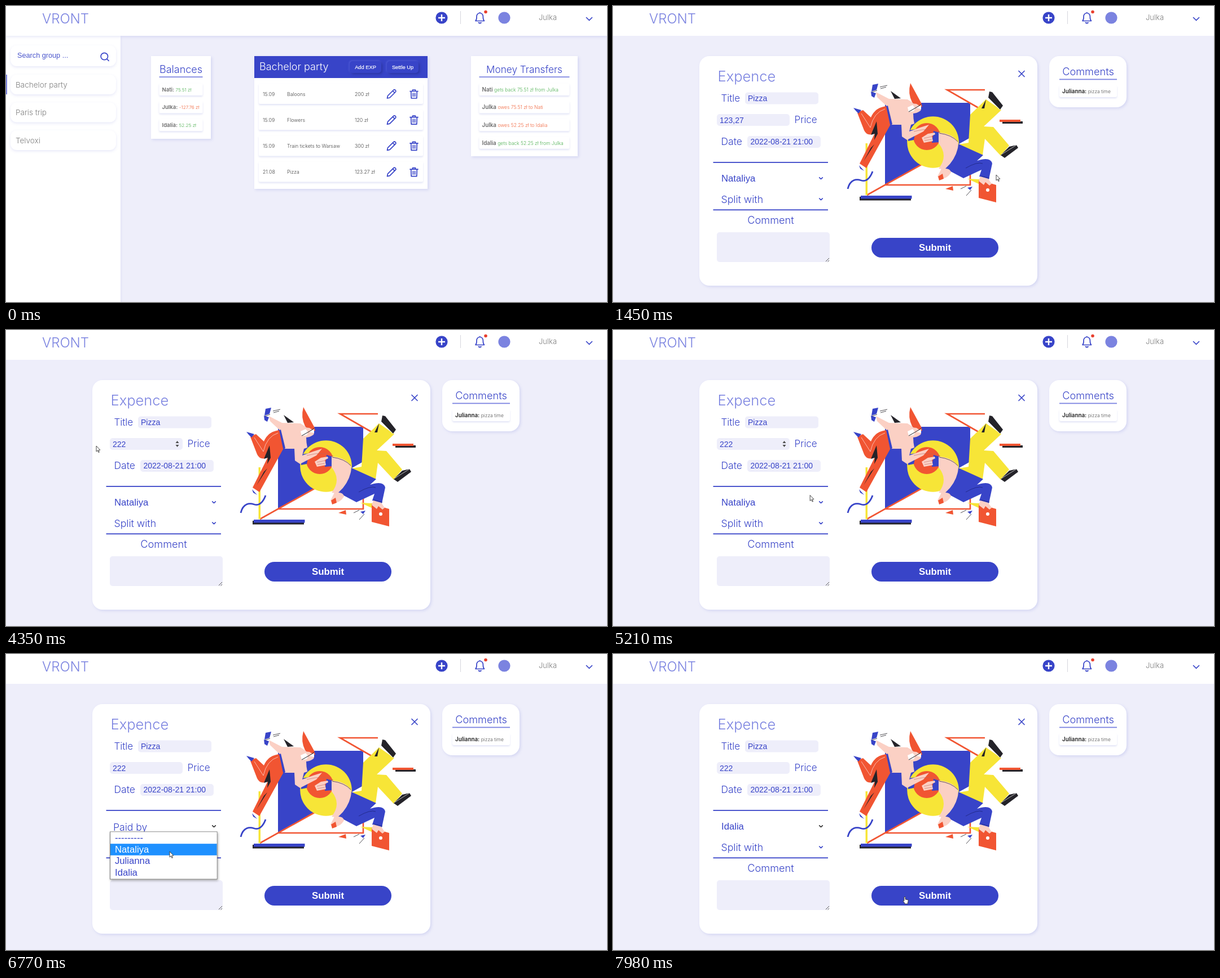
An HTML page for the animation above (8000 ms loop, 1065 px wide and 526 px high).

```html
<!DOCTYPE html>
<html lang="en">
<head>
<meta charset="utf-8">
<title>Shared expenses</title>
<style>
  html, body { margin: 0; width: 100%; height: 100%; overflow: hidden; background: #eeeefa; }
  svg { display: block; width: 100vw; height: 100vh; }
  text { font-family: Inter, sans-serif; font-weight: 340; white-space: pre; }
  .arial { font-family: "Liberation Sans", Arial, sans-serif; font-weight: 400; }
  .mid { text-anchor: middle; }
  .bold { font-weight: 600; }
  .strong { font-weight: 700; }
  .card { filter: drop-shadow(2px 2px 2.5px rgba(70, 80, 200, .15)); }
  .row { filter: drop-shadow(0 2px 1.5px rgba(70, 80, 200, .16)); }
  .soft { filter: drop-shadow(0 2px 2.5px rgba(70, 80, 200, .13)); }
  .raised { filter: drop-shadow(2px 2px 2px rgba(20, 28, 120, .55)) drop-shadow(-1px -1px 1.5px rgba(110, 122, 240, .5)); }
  .popup { filter: drop-shadow(1px 2px 2px rgba(0, 0, 0, .35)); }
  .line { fill: none; stroke: #3844c8; stroke-width: 1.7; stroke-linecap: round; stroke-linejoin: round; }
</style>
</head>
<body>
<svg id="stage" viewBox="0 0 1065 526" preserveAspectRatio="none"></svg>
<script>
const LOOP = 8000;
const BLUE = '#3844c8', LILAC = '#7b83e0', FIELD = '#eeeefa', GRAY = '#7f7f7f';
const GREEN = '#4caf50', RED = '#f0643c';
const ORANGE = '#f15532', YELLOW = '#f7e537', PINK = '#fbd0c4', BLACK = '#242329';

const rect = (x, y, x2, y2, fill, r = 0, cls = '') =>
  `<rect x="${x}" y="${y}" width="${x2 - x}" height="${y2 - y}" rx="${r}" fill="${fill}" class="${cls}"/>`;
const text = (x, y, size, str, fill = BLUE, cls = '', id = '') =>
  `<text x="${x}" y="${y}" font-size="${size}" fill="${fill}" class="${cls}" id="${id}">${str}</text>`;
const arial = (x, y, size, str, fill = BLUE, cls = '', id = '') => text(x, y, size, str, fill, 'arial ' + cls, id);
const circle = (x, y, r, fill) => `<circle cx="${x}" cy="${y}" r="${r}" fill="${fill}"/>`;
const shape = (d, fill) => `<path d="${d}" fill="${fill}"/>`;
const stroke = (d, color, w) => `<path d="${d}" fill="none" stroke="${color}" stroke-width="${w}"/>`;
const icon = (d, x = 0, y = 0, id = '') => `<path class="line" d="${d}" transform="translate(${x} ${y})" id="${id}"/>`;
const pair = (x, y, name, note, color, size, dark = '#6c6c6c') =>
  `<text x="${x}" y="${y}" font-size="${size}" fill="${color}"><tspan class="bold" font-size="${size + 1.3}" fill="${dark}">${name}</tspan><tspan dx="2.5">${note}</tspan></text>`;

function header() {
  return rect(0, 0, 1065, 53, '#fff') +
    text(64, 31, 24, 'VRONT', LILAC) +
    circle(772, 21, 10.6, BLUE) + stroke('M772 15V27M766 21H778', '#fff', 2.4) +
    rect(805, 9, 806, 32, '#d6d6de') +
    icon('M832 26.5C834.5 24 834 21 834 18.500A5.700 6 0 0 1 845.400 18.500C845.400 21 845 24 847.500 26.500ZM837.500 29.500Q839.700 31.500 842 29.500M839.700 12.500V11.500') +
    circle(850, 10.5, 2.8, '#e8402f') +
    circle(883, 21, 10.6, LILAC) +
    text(944, 25.3, 13, 'Julka', GRAY) +
    icon('M1028.500 20.500L1033.500 25.500L1038.500 20.500');
}

function sidebar() {
  const items = ['Bachelor party', 'Paris trip', 'Telvoxi'].map((name, i) => {
    const y = 122 + i * 49.5;
    return rect(8, y, 195, y + 35, '#fff', 11, 'soft') + text(17, y + 22.7, 13.5, name, GRAY);
  });
  return rect(0, 53, 203, 526, '#fff', 0, 'soft') +
    rect(8, 70, 195, 107, '#fff', 11, 'soft') +
    arial(20, 92, 12.7, 'Search group ...', '#4a55cc') +
    icon('M180.500 89.500A6.200 6.200 0 1 1 168.100 89.500A6.200 6.200 0 1 1 180.500 89.500M178.800 94L182 97.300') +
    items.join('') + rect(0, 122, 2, 157, LILAC);
}

function summary(x, x2, bottom, title, size, rows) {
  const a = x + 14.5, b = x2 - 14.5;
  return rect(x, 89, x2, bottom, '#fff', 0, 'card') +
    text((x + x2) / 2, 119, size, title, BLUE, 'mid') + rect(a, 125.3, b, 127, LILAC) +
    rows.map(([name, note, color, s], i) => {
      const y = 137.500 + i * 31.600;
      return rect(a, y, b, y + 21.5, '#fff', 2, 'row') + pair(a + 5, y + 14.3, name, note, color, s);
    }).join('');
}

const pencil = 'M1 16L2 11.500L12.500 1Q14 0 15.500 1.500T16 4.500L5.500 15ZM11 3L14 6';
const bin = 'M0 3H14M4.500 3V.5H9.500V3M1.700 3L2.200 15.500H11.800L12.300 3M5.400 6.500V12M8.600 6.500V12';

function expenses() {
  const rows = [
    ['15.09', 'Baloons', '200 zł'], ['15.09', 'Flowers', '120 zł'],
    ['15.09', 'Train tickets to Warsaw', '300 zł'], ['21.08', 'Pizza', '123.27 zł']
  ].map(([day, what, sum], i) => {
    const y = 138 + i * 46.2, base = y + 21.7;
    return rect(448, y, 739, y + 36, '#fff', 2, 'row') +
      text(455, base, 8.75, day, '#444') + text(498, base, 8.75, what, '#444') + text(618, base, 8.75, sum, '#444') +
      icon(pencil, 674.5, y + 10) + icon(bin, 716, y + 10.5);
  });
  const button = (x, x2, label) => rect(x, 98, x2, 119, BLUE, 5, 'raised') +
    `<g stroke="#fff" stroke-width=".2">${arial((x + x2) / 2, 111.5, 9.3, label, '#fff', 'mid')}</g>`;
  return rect(440, 89, 747, 325, '#fff', 0, 'card') + rect(440, 89, 747, 128, BLUE) +
    text(449, 114, 18, 'Bachelor party', '#fff') +
    button(609, 665, 'Add EXP') + button(675, 731, 'Settle Up') + rows.join('');
}

function dashboard() {
  return sidebar() +
    summary(257, 363, 236, 'Balances', 18, [
      ['Nati:', '75.51 zł', GREEN, 8.2], ['Julka:', '-127.76 zł', RED, 8.2], ['Idalia:', '52.25 zł', GREEN, 8.2]]) +
    expenses() +
    summary(824, 1013, 267, 'Money Transfers', 17.2, [
      ['Nati', 'gets back 75.51 zł from Julka', GREEN, 8.5], ['Julka', 'owes 75.51 zł to Nati', RED, 8.5],
      ['Julka', 'owes 52.25 zł to Idalia', RED, 8.5], ['Idalia', 'gets back 52.25 zł from Julka', GREEN, 8.5]]) +
    rect(0, 40, 1065, 53, '#fff', 0, 'soft');
}

function art() {
  return shape('M482 172H633V234L482 318Z', BLUE) +
    stroke('M450 336L548 281M482 318H633V299M659 149H592L651 183', ORANGE, 2.6) +
    rect(447.5, 244, 451, 336, YELLOW) +
    rect(437, 339, 528, 345.5, BLACK) + rect(439, 337, 529.5, 342.5, BLUE) +
    stroke('M416 325C420 308 431 307 440 310S456 305 460 294', BLUE, 2.8) +
    // falling figure on the right
    circle(567, 242, 45.8, YELLOW) + circle(556, 232, 24, ORANGE) +
    shape('M568 222L579 225V242L565 243ZM523 221L537 219L533 238L523 240Z', BLUE) +
    shape('M661 166L688 185L657 214L674 215L702 248L687 266L659 236L655 265L612 246L630 243L633 193Z', YELLOW) +
    shape('M667 152L672 153L691 177L686 184L665 163ZM715 247L718 252L694 270L687 265L702 250Z', BLACK) +
    stroke('M665 163L686 185M688 264L715 247', '#fff', .7) +
    shape('M653 182L661 166L658 182Z', BLACK) +
    shape('M577 225Q600 226 611 241Q615 261 600 276L590 291L577 289Q595 266 577 244Z', PINK) +
    stroke('M578 226Q600 229 611 241', BLACK, .7) +
    shape('M612 245L656 265L645 275Q669 267 672 280L666 308L649 303L653 291L621 306L589 289Q610 270 612 245Z', BLUE) +
    stroke('M625 288Q646 276 655 280M652 302L667 306', '#1d267d', .8) +
    shape('M582 289Q598 287 599 296Q592 307 582 307L575 303Z', PINK) + shape('M576 303L584 298L586 307L578 310Z', ORANGE) +
    shape('M628 307L649 308L650 317Z', YELLOW) +
    shape('M648 309L679 318V349L648 341Z', ORANGE) + circle(664, 327, 3, '#fff') +
    shape('M651 303L665 307L671 316L667 319L660 313L657 318L648 311Z', PINK) +
    rect(690, 205, 726, 209, BLACK) + rect(685, 202, 722, 206, ORANGE) +
    // running figure on the left
    shape('M438 187L443 185L457 198Q465 179 486 178L492 210L449 288L437 280L464 226Q451 233 445 221L433 190Z', ORANGE) +
    shape('M426 181L440 185L435 191L430 186ZM436 283L445 293L438 289Z', BLUE) +
    shape('M467 205L457 229L464 227L463 238L469 227Z', BLACK) + shape('M457 252L463 246L444 276Z', BLACK) +
    stroke('M440 191L456 216Q462 189 482 183', '#fff', .6) +
    shape('M466 153L489 165L522 166L534 174Q530 191 534 209L528 211L525 223L544 216L560 211L550 223L521 238L512 232L511 211L494 211L485 178L468 162Z', PINK) +
    shape('M484 178L487 177L495 210L491 211ZM460 140L470 138L467 149L458 152ZM457 152L466 155L463 163L458 160Z', BLUE) +
    shape('M492 151L510 164L499 165Z', BLACK) +
    stroke('M473 144L486 141M474 147L484 144M459 153L468 150', BLACK, .8) +
    shape('M527 137L546 172L548 179L540 180L530 171Q522 155 527 137Z', ORANGE) +
    shape('M520 183Q527 171 538 174Q549 180 545 186Q534 194 524 189Z', PINK) +
    shape('M522 180L531 176Q537 181 533 187L524 188ZM537 181L546 176V183Z', '#fff') +
    stroke('M524 188L538 180L546 175', BLACK, 1) +
    shape('M547 234L558 227L570 225L571 228L565 231L567 240L551 243Z', PINK) +
    stroke('M551 235L565 232M552 239L565 237M533 223Q563 215 580 224', '#ba6560', .6) +
    shape('M589 325L602 320L603 328Z', ORANGE) + shape('M628 323L637 321L633 327Z', BLUE) +
    stroke('M616 325L626 320M626 337L635 327', BLACK, .8);
}

function form() {
  const names = ['---------', 'Nataliya', 'Julianna', 'Idalia'];
  const options = names.map((name, i) => `<g class="option">${rect(185, 316.5 + i * 20.7, 373.5, 337.2 + i * 20.7, '#fff')}` +
    arial(193, 332 + i * 20.7, 16.7, name) + '</g>').join('');
  return rect(153, 89, 752, 497, '#fff', 18, 'card') +
    text(185.5, 133.5, 25.5, 'Expence', LILAC) +
    icon('M719 115.500L729 125.500M729 115.500L719 125.500') +
    text(191.5, 170, 17, 'Title') + rect(234, 153.5, 364, 174.5, FIELD, 5) + arial(239, 169, 14, 'Pizza') +
    rect(184, 192, 313, 213, FIELD, 5) + '<rect id="mark" y="195" height="16" fill="#2f8ff5"/>' +
    arial(189, 208, 14, '', BLUE, '', 'price') +
    `<clipPath id="marked"><rect id="clip" y="195" height="16"/></clipPath><g clip-path="url(#marked)">${arial(189, 208, 14, '123,27', '#fff')}</g>` +
    `<g id="spin">${shape('M303.500 197L306.500 201H300.500ZM303.500 208L306.500 204H300.500Z', '#4d4d4d')}</g>` +
    text(321.5, 208, 17, 'Price') +
    text(191.5, 247, 17.5, 'Date') + rect(238, 231, 368, 252, FIELD, 5) + arial(243.5, 246, 14, '2022-08-21 21:00') +
    rect(177.5, 277, 381, 278.8, BLUE) +
    arial(192, 312, 16.7, '', BLUE, '', 'payer') + text(190, 314, 17.6, 'Paid by', BLUE, '', 'hint') +
    icon('M365.700 304.800L368.500 307.500L371.300 304.800', 0, 0, 'drop') +
    text(191.5, 350, 17.7, 'Split with') + icon('M365.700 342L368.500 344.700L371.300 342') +
    rect(177.5, 361.4, 381, 363.2, BLUE) +
    text(279.5, 386.5, 18.2, 'Comment', BLUE, 'mid') +
    rect(184, 402, 384, 455, FIELD, 5) + stroke('M377 454L383 448M380.500 454.500L383 452', '#555', 1) +
    rect(458, 412, 683, 447, BLUE, 17.5) +
    arial(570.5, 435, 16.9, 'Submit', '#fff', 'mid strong') +
    art() +
    rect(773, 89, 910, 180, '#fff', 18, 'card') +
    text(842, 122.5, 18.2, 'Comments', BLUE, 'mid') + rect(791, 129.5, 893, 131.3, LILAC) +
    rect(791, 141, 893, 162, '#fff', 3, 'row') +
    pair(796, 154.5, 'Julianna:', 'pizza time', '#555', 8.5, '#222') +
    `<g id="list"><rect x="184.500" y="316" width="189.500" height="84" fill="#fff" stroke="#777" class="popup"/>${options}</g>`;
}

const pointers = {
  arrow: '<path d="M0 0V10L2.300 8L4 11.600L5.400 11L3.800 7.500L6.800 7.200Z" fill="#fff" stroke="#333" stroke-width=".9"/>',
  hand: '<path d="M-1.100 1Q0 -.6 1.100 1V5L5 5.700Q6.400 6 6.200 8L5.300 10.500V13H-.2V11.500L-2.800 8.300Q-2.800 6.500 -1.100 7.700Z" fill="#fff" stroke="#333" stroke-width=".9"/>',
  beam: '<path d="M-2 -6H2M0 -6V6M-2 6H2" fill="none" stroke="#333"/>'
};

document.getElementById('stage').innerHTML = rect(0, 0, 1065, 526, FIELD) +
  `<g id="dash">${dashboard()}</g><g id="form">${form()}</g>${header()}<g id="pointer"></g>`;
const ui = {};
for (const el of document.querySelectorAll('[id]:not([id=""])')) ui[el.id] = el;
const options = [...document.querySelectorAll('.option')];
const show = (el, on) => el.setAttribute('visibility', on ? 'visible' : 'hidden');
const clamp = (v, lo, hi) => Math.min(hi, Math.max(lo, v));

// start, end, x, y, sideways bend of the path
const moves = [
  [170, 970, 677, 290, -20], [990, 1290, 679, 300, 0], [1740, 2540, 238, 204, 0], [2570, 2740, 160, 206, 0],
  [4350, 4650, 294, 270, 0], [4890, 5410, 376, 305, 0], [5560, 6030, 362, 306, 0],
  [6680, 6770, 290, 351, 0], [6770, 7100, 252, 384, 0], [7650, 7980, 517, 431, 0]
];

function pointerAt(t) {
  let x = 988, y = 514;
  for (const [from, to, nx, ny, bend] of moves) {
    if (t < from) break;
    const k = clamp((t - from) / (to - from), 0, 1), e = k * k * (3 - 2 * k);
    x += (nx - x) * e;
    y += (ny - y) * e + bend * Math.sin(Math.PI * e);
    if (k < 1) break;
  }
  return [x, y];
}

function pointerKind(t, x, y) {
  const over = (a, b, c, d) => x >= a && x <= c && y >= b && y <= d;
  if (t < 1450) return over(672, 284, 694, 306) || over(714, 284, 732, 306) ? 'hand' : 'arrow';
  if (t >= 6200 && t < 7440) return 'arrow';
  if (over(184, 297, 381, 355) || over(458, 412, 683, 447)) return 'hand';
  if (over(184, 192, 313, 213) || over(238, 231, 368, 252) || over(184, 402, 384, 455)) return 'beam';
  return 'arrow';
}

let kind = '';
function draw(t) {
  const page = t >= 1450, [x, y] = pointerAt(t);
  ui.dash.style.display = page ? 'none' : '';
  ui.form.style.display = page ? '' : 'none';

  show(ui.pointer, t >= 170);
  ui.pointer.setAttribute('transform', `translate(${x} ${y})`);
  const next = pointerKind(t, x, y);
  if (next !== kind) ui.pointer.innerHTML = pointers[kind = next];

  ui.price.textContent = t < 3470 ? '123,27' : '2'.repeat(1 + (t >= 3690) + (t >= 3840));
  const left = clamp(x, 189, 232), marked = t >= 2570 && t < 3470;
  for (const el of [ui.mark, ui.clip]) {
    el.setAttribute('x', left);
    el.setAttribute('width', marked ? 232 - left : 0);
  }
  show(ui.spin, page && (t >= 2570 && t < 5560 || next === 'beam' && y < 214));

  ui.payer.textContent = t < 5560 ? 'Nataliya' : t < 7290 ? '' : 'Idalia';
  show(ui.hint, t >= 5560 && t < 7290);
  ui.drop.style.stroke = t < 5560 ? BLUE : '#333';

  const open = clamp((t - 6170) / 140, 0, 1) * clamp((7440 - t) / 150, 0, 1);
  ui.list.style.display = t >= 6200 && t < 7440 ? '' : 'none';
  ui.list.setAttribute('opacity', open);
  const hover = clamp(Math.floor((y - 316.5) / 20.7), 0, 3);
  options.forEach((el, i) => {
    el.firstChild.setAttribute('fill', i === hover ? '#1e90ff' : '#fff');
    el.lastChild.setAttribute('fill', i === hover ? '#fff' : BLUE);
  });
}

const start = performance.now();
function tick() {
  draw((performance.now() - start) % LOOP);
  requestAnimationFrame(tick);
}
tick();
</script>
</body>
</html>
```
